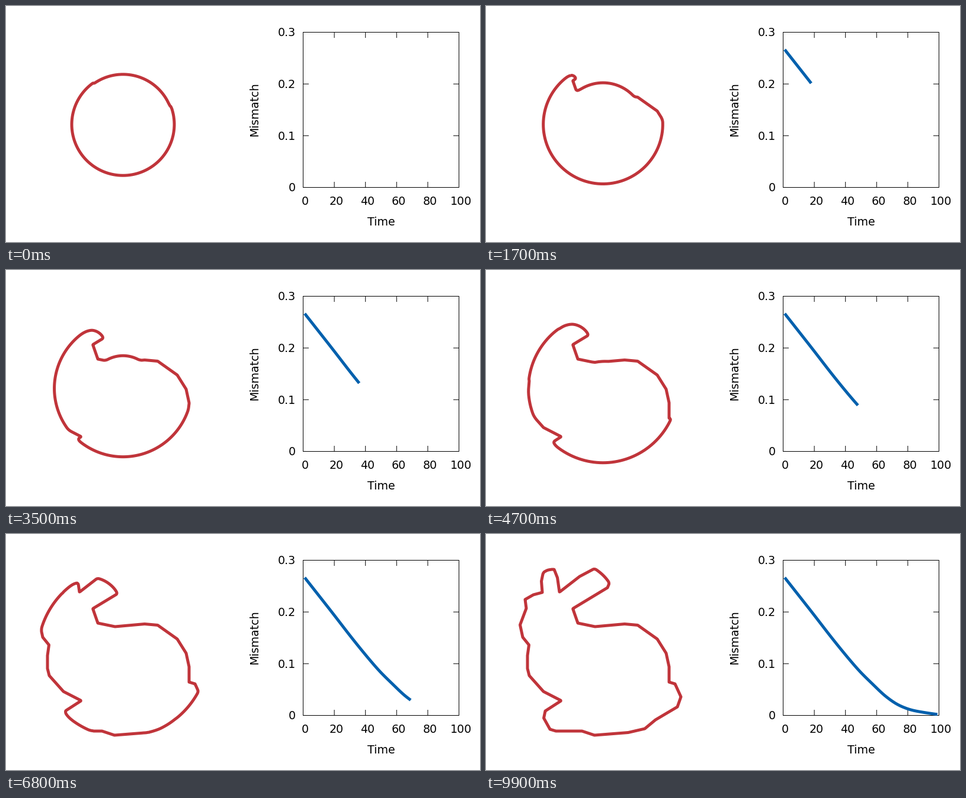
A matplotlib script that plays this animation: 800 px wide and 400 px high, repeating every 10 s.

```python
import numpy as np
import matplotlib.pyplot as plt
from matplotlib.animation import FuncAnimation
from matplotlib.patches import PathPatch
from matplotlib.path import Path

W, H, DPI = 800, 400, 100
PX = 72 / DPI                      # points per pixel
FRAMES, SUBSTEPS = 100, 2
CX, CY, R0, SPEED = 197.5, 200.7, 85.7, 0.84
START_MISMATCH = 0.2665
RED, BLUE = "#c0343a", "#0060ad"

# Corners of the silhouette, clockwise from the left ear
BUNNY = np.array([
    (95, 99), (93.5, 80), (97, 63), (103, 60), (115, 60), (120.5, 74),
    (124, 98.5), (158, 72), (188, 56), (203, 66), (210, 79), (205, 91),
    (146.5, 126.5), (155, 151), (184, 157), (234, 152.5), (256, 154.5),
    (289, 178), (304, 202), (309, 225), (309, 251), (319, 254), (329, 276),
    (323, 293), (286, 315), (268, 330), (240, 336.5), (183, 341),
    (162, 334), (118, 334), (108, 331), (97.5, 312), (100, 300),
    (127, 282.5), (97, 267), (73, 240), (70, 228), (70, 206), (72.5, 188),
    (62, 175), (57.5, 154), (68, 126), (66, 111), (80, 103)])


def polygon_sdf(poly, x, y):
    """Signed distance to a polygon, negative inside."""
    dist = np.full(x.shape, np.inf)
    for (px, py), (qx, qy) in zip(poly, np.roll(poly, -1, axis=0)):
        ex, ey = qx - px, qy - py
        u = np.clip(((x - px) * ex + (y - py) * ey) / (ex**2 + ey**2), 0, 1)
        dist = np.minimum(dist, np.hypot(x - px - u * ex, y - py - u * ey))
    inside = Path(poly).contains_points(np.c_[x.ravel(), y.ravel()])
    return np.where(inside.reshape(x.shape), -dist, dist)


def grow(phi, speed):
    """Move the front of phi outward by one frame (upwind scheme)."""
    for _ in range(SUBSTEPS):
        grad2 = 0
        for axis in (0, 1):
            d = np.diff(phi, axis=axis)
            pad = [(0, 0), (0, 0)]
            pad[axis] = (1, 0)
            back = np.pad(d, pad)
            pad[axis] = (0, 1)
            ahead = np.pad(d, pad)
            grad2 = grad2 + np.maximum(np.maximum(back, -ahead), 0) ** 2
        phi = phi - speed / SUBSTEPS * np.sqrt(grad2)
    return phi


def coverage(sdf):
    return np.clip(0.5 - sdf, 0, 1)


def simulate(ax):
    """Circle fitted to the bunny: grows inside it, shrinks outside it."""
    gx, gy = np.meshgrid(np.arange(40.0, 342), np.arange(40.0, 360))
    body = polygon_sdf(BUNNY, gx, gy)
    outer = np.hypot(gx - CX, gy - CY) - R0
    inner = -outer
    inside = np.clip(0.5 - body / 4, 0, 1)      # soft edge slows the front
    paths, misses = [], []
    for _ in range(FRAMES):
        outer = grow(outer, SPEED * inside)
        inner = grow(inner, SPEED * (1 - inside))
        shape = np.minimum(-inner, np.maximum(body, outer))
        cs = ax.contour(gx, gy, shape, levels=[0])
        paths.append(cs.get_paths()[0])
        cs.remove()
        misses.append(np.abs(coverage(shape) - coverage(body)).sum())
    return paths, START_MISMATCH * np.array(misses) / misses[0]


LEFT, RIGHT, TOP, BOTTOM, TICK = 501.5, 764.5, 44.5, 307.5, 9


def plot_x(t):
    return LEFT + (RIGHT - LEFT) * t / 100


def plot_y(m):
    return BOTTOM - (BOTTOM - TOP) * m / 0.3


def draw_axes(ax):
    def line(xs, ys):
        ax.plot(xs, ys, color="black", lw=PX, snap=False, zorder=1)

    def label(x, y, s, ha="center", rotation=0):
        ax.text(x, y, s, ha=ha, va="baseline", rotation=rotation,
                rotation_mode="anchor", fontsize=19 * PX,
                family="DejaVu Sans")

    line([LEFT, RIGHT, RIGHT, LEFT, LEFT], [TOP, TOP, BOTTOM, BOTTOM, TOP])
    for t in range(0, 101, 20):
        x = plot_x(t)
        if 0 < t < 100:
            line([x, x], [BOTTOM, BOTTOM - TICK])
            line([x, x], [TOP, TOP + TICK])
        label(x + 3.5, 337, str(t))
    for m in (0, 0.1, 0.2, 0.3):
        y = plot_y(m)
        if 0 < m < 0.3:
            line([LEFT, LEFT + TICK], [y, y])
            line([RIGHT, RIGHT - TICK], [y, y])
        label(488.5, y + 6.7, f"{m:g}", ha="right")
    label(633.5, 372, "Time")
    label(425.5, 175.5, "Mismatch", rotation=90)


fig = plt.figure(figsize=(W / DPI, H / DPI), dpi=DPI, facecolor="white")
ax = fig.add_axes([0, 0, 1, 1])
paths, mismatch = simulate(ax)
ax.set(xlim=(0, W), ylim=(H, 0))
ax.axis("off")
draw_axes(ax)

curve_x = plot_x(np.arange(1, FRAMES))
curve_y = plot_y(mismatch[:-1])

outline = ax.add_patch(PathPatch(paths[0], fill=False, ec=RED, lw=5 * PX,
                                 joinstyle="round"))
curve, = ax.plot([], [], color=BLUE, lw=5 * PX, solid_capstyle="butt",
                 zorder=3)


def update(i):
    outline.set_path(paths[i])
    curve.set_data(curve_x[:i + 1], curve_y[:i + 1])
    return outline, curve


anim = FuncAnimation(fig, update, frames=FRAMES, interval=100,
                     repeat=True, repeat_delay=0)
plt.show()
```
